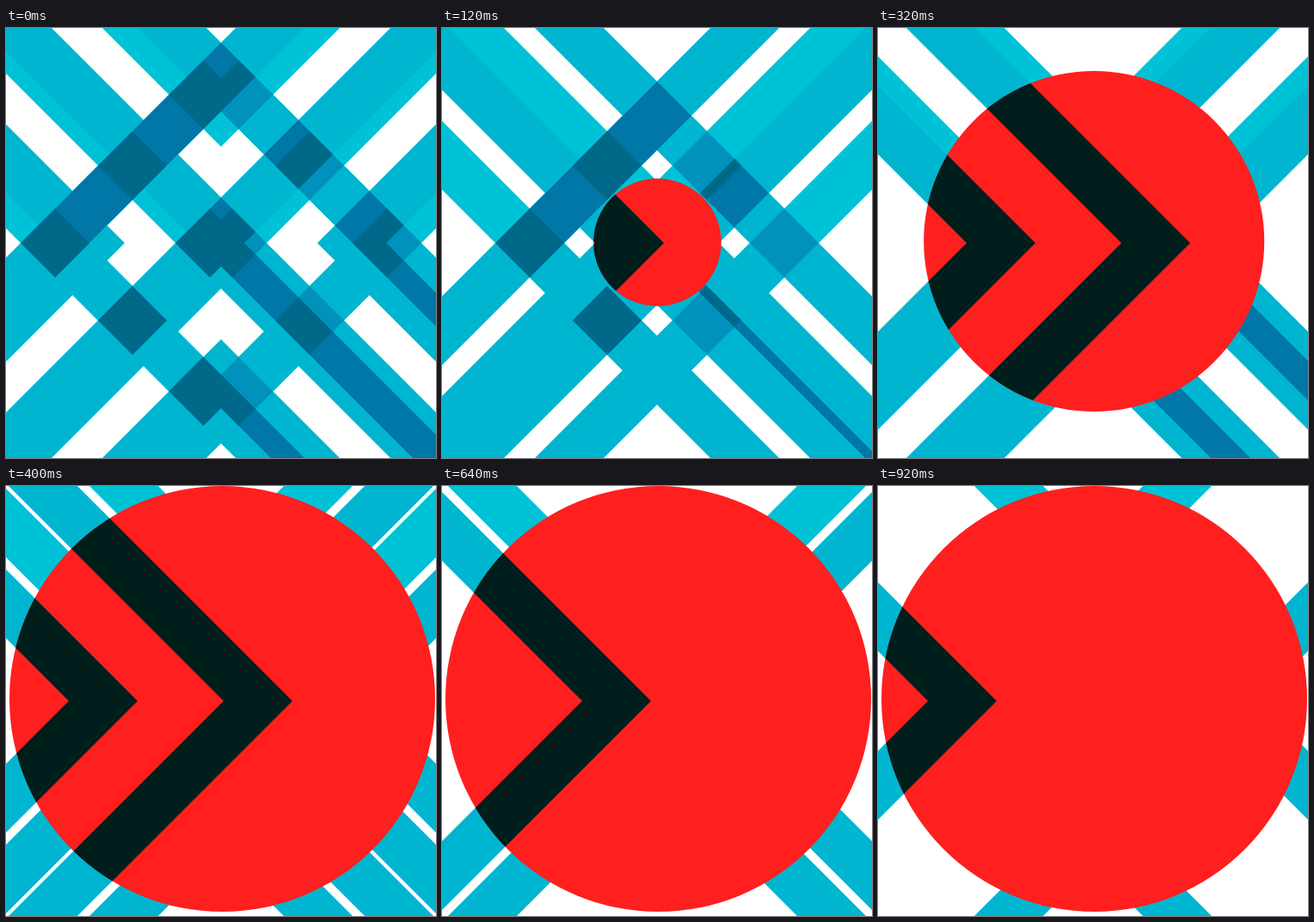
An HTML page with a canvas that plays this animation: 500 px wide and 500 px high, repeating every 0.96 s.

```html
<!DOCTYPE html>
<html lang="en">
<head>
<meta charset="utf-8">
<title>Crossing chevrons</title>
<style>
  html, body { margin: 0; width: 100%; height: 100%; overflow: hidden; background: #fff; }
  canvas { display: block; width: 500px; height: 500px; }
</style>
</head>
<body>
<canvas id="stage" width="500" height="500"></canvas>
<script>
const SIZE = 500, MID = 250, LOOP = 960, STEP = 40;
const THICK = 80, ARM = 700, SPEED = 15, END = 138;
const COLOR = {
  light: '#00c2d6', cyan: '#00b5d0', mid: '#0092bc', blue: '#0077a6',
  deep: '#00698a', red: '#ff1f1f', black: '#001e1c'
};
const ctx = document.getElementById('stage').getContext('2d');

// Tips of the chevrons still on their way out at a given step.
function tipsAt(step) {
  const tips = [483, 303].map(start => start - SPEED * step).filter(tip => tip >= END);
  if (step === 0) tips.push(END);
  return tips;
}

// All chevrons of one direction; 0 points right, then clockwise in quarter turns.
function chevrons(tips, turn) {
  const shape = new Path2D();
  for (const tip of tips) {
    const inner = tip - THICK;
    shape.moveTo(tip, MID);
    shape.lineTo(tip - ARM, MID - ARM);
    shape.lineTo(inner - ARM, MID - ARM);
    shape.lineTo(inner, MID);
    shape.lineTo(inner - ARM, MID + ARM);
    shape.lineTo(tip - ARM, MID + ARM);
    shape.closePath();
  }
  const path = new Path2D();
  path.addPath(shape, new DOMMatrix().translate(MID, MID).rotate(90 * turn).translate(-MID, -MID));
  return path;
}

function fill(color, path) {
  ctx.fillStyle = color;
  ctx.fill(path);
}

function within(path, paint) {
  ctx.save();
  ctx.clip(path);
  paint();
  ctx.restore();
}

function draw(step) {
  const tips = tipsAt(step);
  const [right, down, left, up] = [0, 1, 2, 3].map(turn => chevrons(tips, turn));

  ctx.fillStyle = '#fff';
  ctx.fillRect(0, 0, SIZE, SIZE);
  fill(COLOR.light, down);
  for (const path of [right, left, up]) fill(COLOR.cyan, path);

  // Overlaps with the upward chevrons darken.
  within(up, () => {
    fill(COLOR.mid, down);
    fill(COLOR.blue, left);
    within(left, () => fill(COLOR.deep, down));
  });

  const grow = Math.min(step, 10);
  if (grow > 0) {
    const disc = new Path2D();
    disc.arc(MID + 0.15 * grow, MID - 0.25 * grow, 24.75 * grow, 0, 2 * Math.PI);
    fill(COLOR.red, disc);
    within(disc, () => fill(COLOR.black, right));
  }
}

const start = performance.now();
let shown = -1;
function tick() {
  const step = Math.floor((performance.now() - start) % LOOP / STEP);
  if (step !== shown) draw(shown = step);
  requestAnimationFrame(tick);
}
tick();
</script>
</body>
</html>
```
